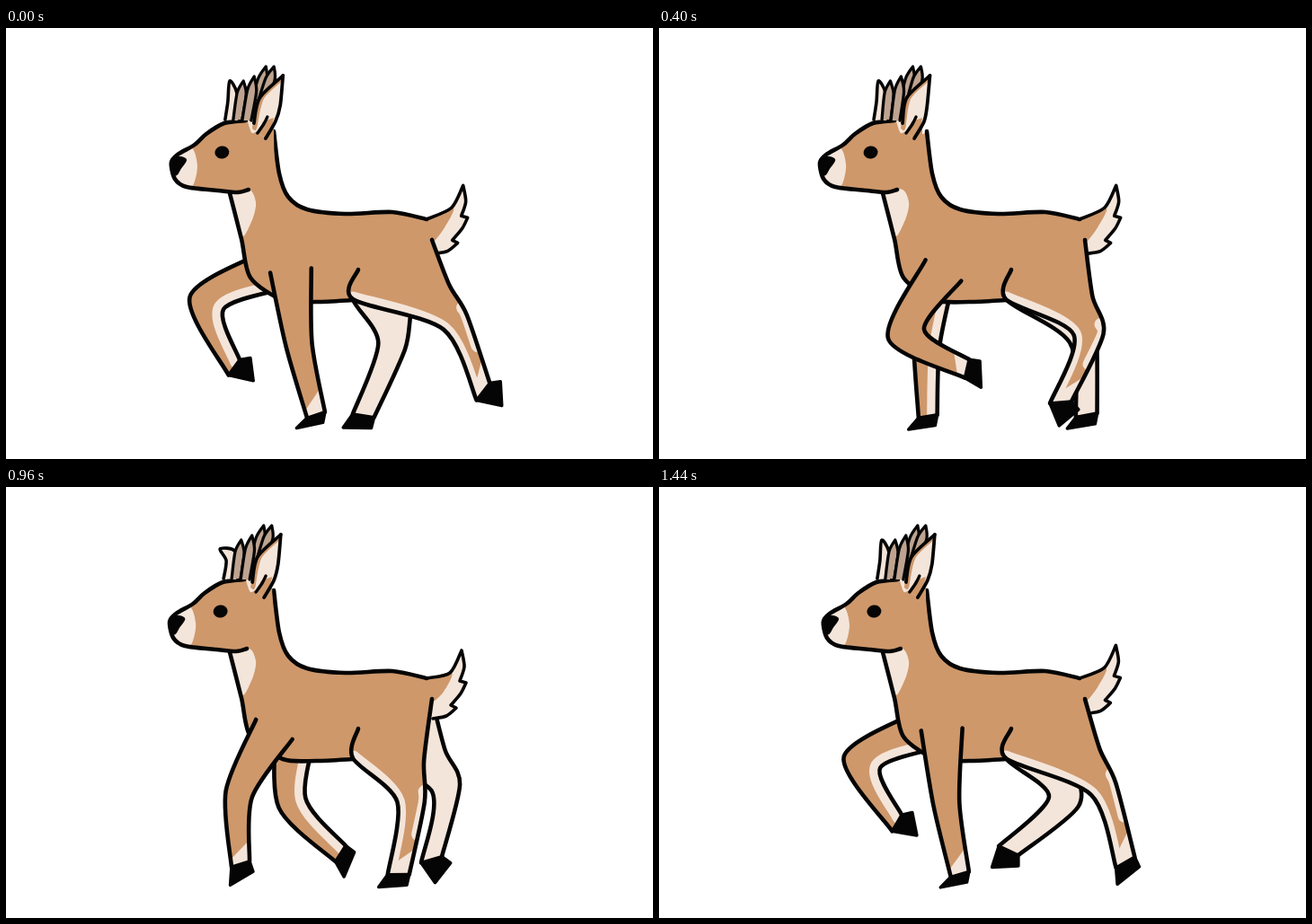
These frames come from a looping animation (720x480 px, 1.52 s). An HTML page with a canvas:

```html
<!DOCTYPE html>
<html lang="en">
<head>
<meta charset="utf-8">
<title>Walking deer</title>
<style>
html, body { margin: 0; width: 100%; height: 100%; overflow: hidden; background: #fff; }
canvas { display: block; }
</style>
</head>
<body>
<canvas id="stage" width="720" height="480"></canvas>
<script>
const ctx = document.getElementById('stage').getContext('2d');
const BROWN = '#ce986b', CREAM = '#f4e5da', ANTLER = '#bea390', INK = '#050505';
const STEP = 80, STEPS = 19, RAD = Math.PI / 180;

// Gait keys: step, ankle x, ankle y, toe direction in degrees.
// The far legs run through the same gait half a cycle later.
const FRONT = {
  upper: 82, lower: 78, maxReach: .998, kneeSide: 1, kneeWidth: 14.5, ankleWidth: 10.5,
  gait: [
    [0, 345, 431, 146], [2.4, 370, 412, 88], [3, 384, 390, 49], [4.5, 356, 380, 55],
    [7, 290, 377, 46], [9.2, 253, 373, 25], [12, 261, 420, 116], [13, 284, 433, 146]
  ],
  hip: ankle => [309 + (ankle[0] - 309) * .22, 270],
  top: (hip, n) => [[along(hip, n, 23)], [along(hip, n, -23)]]
};
const HIND = {
  upper: 99, lower: 82, maxReach: .985, kneeSide: -1, kneeWidth: 15, ankleWidth: 12,
  gait: [
    [0, 531, 405, 37], [3, 462, 417, 90], [4.5, 455, 418, 85], [7, 415, 413, 129],
    [8.5, 389, 405, 135], [9.2, 393, 432, 150], [16.5, 507, 431, 144], [18, 519, 418, 110]
  ],
  hip: () => [433, 253],
  top: (hip, n, hock) => [
    [[392, 269], [386, 302]],
    [[474, 236], shift([mix([474, 236], hock, .6)], -4, 0)[0]]
  ]
};

const pairs = list => list.flatMap((x, i) => i % 2 ? [] : [[x, list[i + 1]]]);
const mix = (a, b, f) => a.map((v, i) => v + (b[i] - v) * f);
const shift = (pts, dx, dy) => pts.map(([x, y]) => [x + dx, y + dy]);
const along = ([x, y], angle, r) => [x + r * Math.cos(angle), y + r * Math.sin(angle)];
const angleTo = (a, b) => Math.atan2(b[1] - a[1], b[0] - a[0]);

// Smooth curve through the points, appended to the given path.
function curve(pts, path = new Path2D(), join = false) {
  path[join ? 'lineTo' : 'moveTo'](...pts[0]);
  for (let i = 0; i < pts.length - 1; i++) {
    const a = pts[i], b = pts[i + 1], p = pts[i - 1] || a, n = pts[i + 2] || b, s = 7;
    path.bezierCurveTo(a[0] + (b[0] - p[0]) / s, a[1] + (b[1] - p[1]) / s,
      b[0] - (n[0] - a[0]) / s, b[1] - (n[1] - a[1]) / s, ...b);
  }
  return path;
}
function poly(pts) {
  const path = new Path2D();
  pts.forEach(p => path.lineTo(...p));
  path.closePath();
  return path;
}
function fill(path, color) { ctx.fillStyle = color; ctx.fill(path); }
function stroke(path, width = 4.6, color = INK) {
  ctx.lineWidth = width;
  ctx.strokeStyle = color;
  ctx.stroke(path);
}
function clipped(path, paint) {
  ctx.save();
  ctx.clip(path);
  paint();
  ctx.restore();
}

function gaitAt(keys, step) {
  const i = keys.findLastIndex(k => k[0] <= step);
  const a = keys[i], b = keys[i + 1] || [STEPS, ...keys[0].slice(1)];
  return mix(a, b, (step - a[0]) / (b[0] - a[0])).slice(1);
}

// Two-bone leg: the ankle follows the gait, the middle joint is solved from bone lengths.
function pose(rig, step) {
  const [x, y, toeDegrees] = gaitAt(rig.gait, step % STEPS);
  const ankle = [x, y], hip = rig.hip(ankle), toeAngle = toeDegrees * RAD;
  const reach = Math.hypot(x - hip[0], y - hip[1]);
  const scale = Math.max(1, reach / (rig.maxReach * (rig.upper + rig.lower)));
  const u = rig.upper * scale, l = rig.lower * scale;
  const bend = Math.acos((u * u + reach * reach - l * l) / (2 * u * reach));
  const thigh = angleTo(hip, ankle) + rig.kneeSide * bend;
  const knee = along(hip, thigh, u), shin = angleTo(knee, ankle);

  const kneeNormal = (thigh + shin + Math.PI) / 2;
  const kneeHalf = rig.kneeWidth / Math.cos((thigh - shin) / 2);
  const shinNormal = shin + Math.PI / 2;
  const cuff = shinNormal + (toeAngle - shinNormal) * .25;
  const backKnee = along(knee, kneeNormal, -kneeHalf);
  const [frontTop, backTop] = rig.top(hip, thigh + Math.PI / 2, backKnee);
  const backAnkle = along(ankle, cuff, -rig.ankleWidth);
  return {
    front: [...frontTop, along(knee, kneeNormal, kneeHalf), along(ankle, cuff, rig.ankleWidth)],
    back: [...backTop, backKnee, backAnkle],
    toe: along(ankle, toeAngle, 26),
    heel: along(backAnkle, toeAngle - Math.PI / 4, 12)
  };
}

function leg(rig, step, color, shade) {
  const { front, back, toe, heel } = pose(rig, step);
  const shape = curve([...back].reverse(), curve(front), true);
  fill(shape, color);
  clipped(shape, () => shade(front, back));
  stroke(curve(front));
  stroke(curve(back));
  const hoof = poly([front.at(-1), back.at(-1), heel, toe]);
  fill(hoof, INK);
  stroke(hoof, 3.5);
}
function ankleShade(front, back) {
  const f = front.at(-1), b = back.at(-1);
  fill(poly([f, b, mix(b, back.at(-2), .35), mix(f, front.at(-2), .1)]), CREAM);
}
function hindShade(front, back) {
  const hock = back.at(-2);
  stroke(curve(front.slice(1)), 17, CREAM);
  stroke(curve([mix(hock, back.at(-3), .25), hock, mix(hock, back.at(-1), .45)]), 14, CREAM);
  ankleShade(front, back);
}
function innerShade(front, back) {
  stroke(curve(back), 23, CREAM);
}

function tail(dx, dy) {
  const edge = shift(pairs([508,174, 511,192, 506,208, 513,210, 507,222, 496,235, 502,238, 491,247, 476,250]), dx, dy);
  const outline = curve([[468,213], [495 + dx, 199 + dy], edge[0]]);
  for (const i of [0, 3, 6]) curve(edge.slice(i, i + 3), outline, true);
  const shape = new Path2D(outline);
  shape.lineTo(466, 235);
  fill(shape, CREAM);
  fill(curve([[466,214], [497 + dx, 199 + dy], [488 + dx, 220 + dy], [474,240], [464,240]]), BROWN);
  stroke(outline, 3.6);
}

function body() {
  const back = pairs([298,115, 304,162, 314,188, 335,202, 378,207, 430,205, 468,213]);
  const under = pairs([249,184, 262,235, 272,278, 308,303, 345,305, 386,303]);
  const shape = curve(back);
  [[475,236], [462,264]].forEach(p => shape.lineTo(...p));
  curve([...under].reverse(), shape, true);
  shape.lineTo(250, 150);
  fill(shape, BROWN);
  fill(curve(pairs([250,181, 271,180, 278,194, 275,211, 264,232, 258,212, 250,181])), CREAM);
  stroke(curve(back));
  stroke(curve(under));
}

function prong(base, tip) {
  const mid = mix(base, tip, .7), w = 5;
  const shape = curve([shift([base], -w, 0)[0], shift([mid], -w, 0)[0], tip]);
  curve([tip, shift([mid], w, 2)[0], shift([base], w, 0)[0]], shape, true);
  fill(shape, ANTLER);
  stroke(shape, 3.3);
}

function headgear(sway, flick) {
  const farTip = [248 - 9 * flick, 59 + 10 * flick];
  const farEar = curve([[243,102], [246,82], farTip, [256,72], [259,103]]);
  fill(farEar, CREAM);
  stroke(farEar, 3.6);

  prong([276,88], [288 + sway,43]);
  prong([284,84], [297 + sway,43]);
  prong([257,102], [263 + sway,59]);
  prong([267,103], [275 + sway,54]);

  const inner = [[273,112], [281 + sway,78], [307 + sway,53]];
  const outer = [inner[2], [304 + sway,86], [299,104], [288,123]];
  const ear = curve(outer, curve(inner), true);
  fill(ear, CREAM);
  clipped(ear, () => {
    stroke(curve(shift(inner, 0, -2)), 11, BROWN);
    fill(poly(pairs([285,104, 297,100, 292,126, 278,122])), BROWN);
  });
  stroke(curve([[275,106], ...inner.slice(1)]), 3.8);
  stroke(curve(outer), 3.8);
  stroke(curve(pairs([279,117, 286,107, 290,99])), 3.4);
}

function head(blink) {
  const outline = curve(pairs([266,103, 242,106, 222,118, 209,130, 190,141, 183,150, 187,168, 200,177, 235,181, 257,183, 269,180]));
  const shape = new Path2D(outline);
  [[298,160], [297,112], [280,103]].forEach(p => shape.lineTo(...p));
  fill(shape, BROWN);
  clipped(shape, () => fill(curve(pairs([180,138, 205,133, 212,152, 209,171, 201,182, 180,180])), CREAM));
  fill(curve(pairs([268,104, 275,101, 281,111, 273,117, 268,104])), CREAM);
  stroke(outline);
  const nose = curve(pairs([184,149, 191,144, 199,147, 193,156, 188,163, 184,149]));
  fill(nose, INK);
  stroke(nose, 2.5);
  const eye = new Path2D();
  eye.ellipse(239.5, 138.5, 8, 7 - 5 * blink, -.15, 0, Math.PI * 2);
  fill(eye, INK);
}

function draw(step) {
  const turn = 2 * Math.PI / STEPS, farStep = step + STEPS / 2;
  const nod = 2.5 * Math.cos(2 * turn * (step - .5)) - 1.5;
  const wag = Math.cos(turn * (step - 12));
  ctx.fillStyle = '#fff';
  ctx.fillRect(0, 0, 720, 480);
  leg(HIND, farStep, CREAM, () => {});
  leg(FRONT, farStep, BROWN, innerShade);
  tail(-wag, 4 + 4 * wag);
  body();
  leg(HIND, step, BROWN, hindShade);
  leg(FRONT, step, BROWN, ankleShade);
  ctx.save();
  ctx.translate(nod, 0);
  head(Math.max(0, 1 - Math.abs(step - 9) / 2));
  headgear(nod * .4, Math.exp(-(((step - 12) / 3) ** 2)));
  ctx.restore();
}

ctx.lineCap = ctx.lineJoin = 'round';
function tick() {
  draw(Math.floor(performance.now() / STEP) % STEPS);
  requestAnimationFrame(tick);
}
tick();
</script>
</body>
</html>
```
